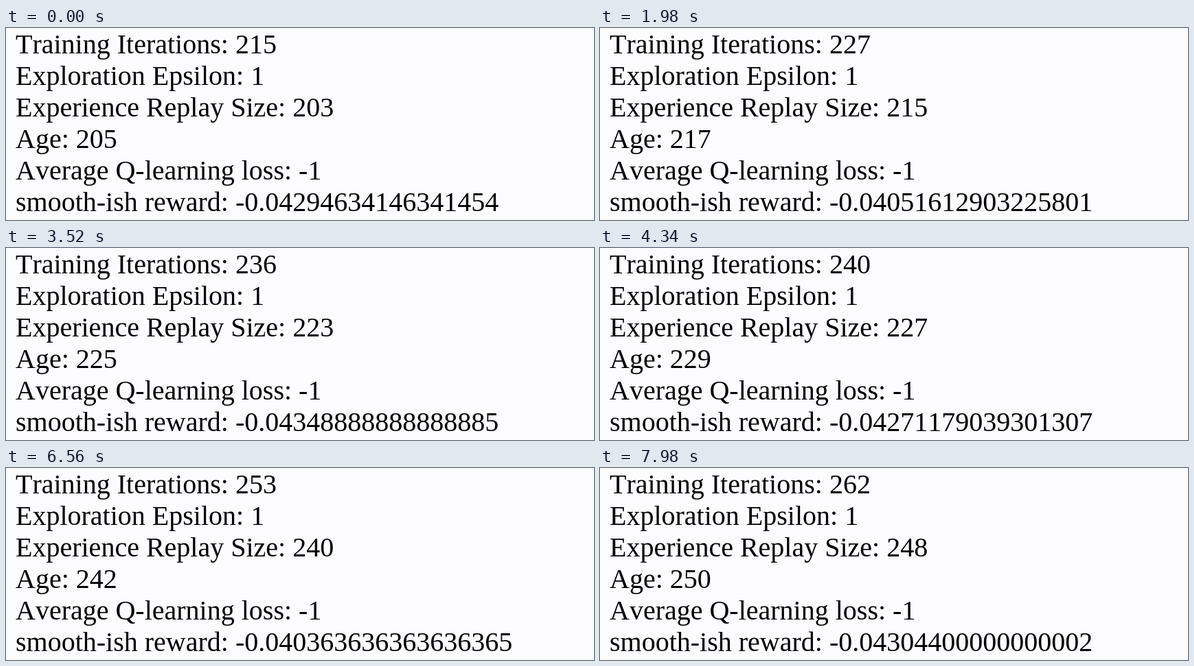
Recreate the animation shown at these times as an HTML page. Size 856 by 280 pixels, loop 8 s.

```html
<!DOCTYPE html>
<html lang="en">
<head>
<meta charset="utf-8">
<title>Training statistics</title>
<style>
  html, body { margin: 0; width: 100%; height: 100%; overflow: hidden; background: #fcfcff; }
  #stats {
    position: absolute; left: 14px; top: 1px; margin: 0;
    font: 40px/46px "Liberation Serif", "Times New Roman", serif;
    font-kerning: none; font-variant-ligatures: none;
    color: #000; white-space: pre;
  }
</style>
</head>
<body>
<pre id="stats"></pre>
<script>
const LOOP = 8000;
const FIRST = { iteration: 215, age: 205, reward: -0.04294634146341454 };
const TICKS_PER_STEP = 0.275;
const ITERATIONS_PER_LIFE = 23.5;
const stats = document.getElementById("stats");

const livesLost = iteration => Math.floor(iteration / ITERATIONS_PER_LIFE);
const dies = iteration => livesLost(iteration) > livesLost(iteration - 1);

// The display refreshes three times per 140 ms: after 20, 20 and 100 ms.
function stepAt(time) {
  const shifted = time + 20;
  return 3 * Math.floor(shifted / 140) + Math.min(2, Math.floor(shifted % 140 / 20)) - 1;
}

// Each step earns 0.001, a crash costs 1, and the restart after it earns nothing.
function stateAt(time) {
  const iteration = FIRST.iteration + Math.floor(0.2 + TICKS_PER_STEP * stepAt(time));
  let age = FIRST.age;
  let total = FIRST.reward * FIRST.age;
  for (let i = FIRST.iteration + 1; i <= iteration; i++) {
    if (dies(i - 1)) continue;
    age++;
    total += dies(i) ? -1 : 0.001;
  }
  return { iteration, age, reward: total / age };
}

function draw() {
  const { iteration, age, reward } = stateAt(performance.now() % LOOP);
  const text = [
    `Training Iterations: ${iteration}`,
    "Exploration Epsilon: 1",
    `Experience Replay Size: ${age - 2}`,
    `Age: ${age}`,
    "Average Q-learning loss: -1",
    `smooth-ish reward: ${reward}`
  ].join("\n");
  if (stats.textContent !== text) stats.textContent = text;
  requestAnimationFrame(draw);
}
draw();
</script>
</body>
</html>
```
